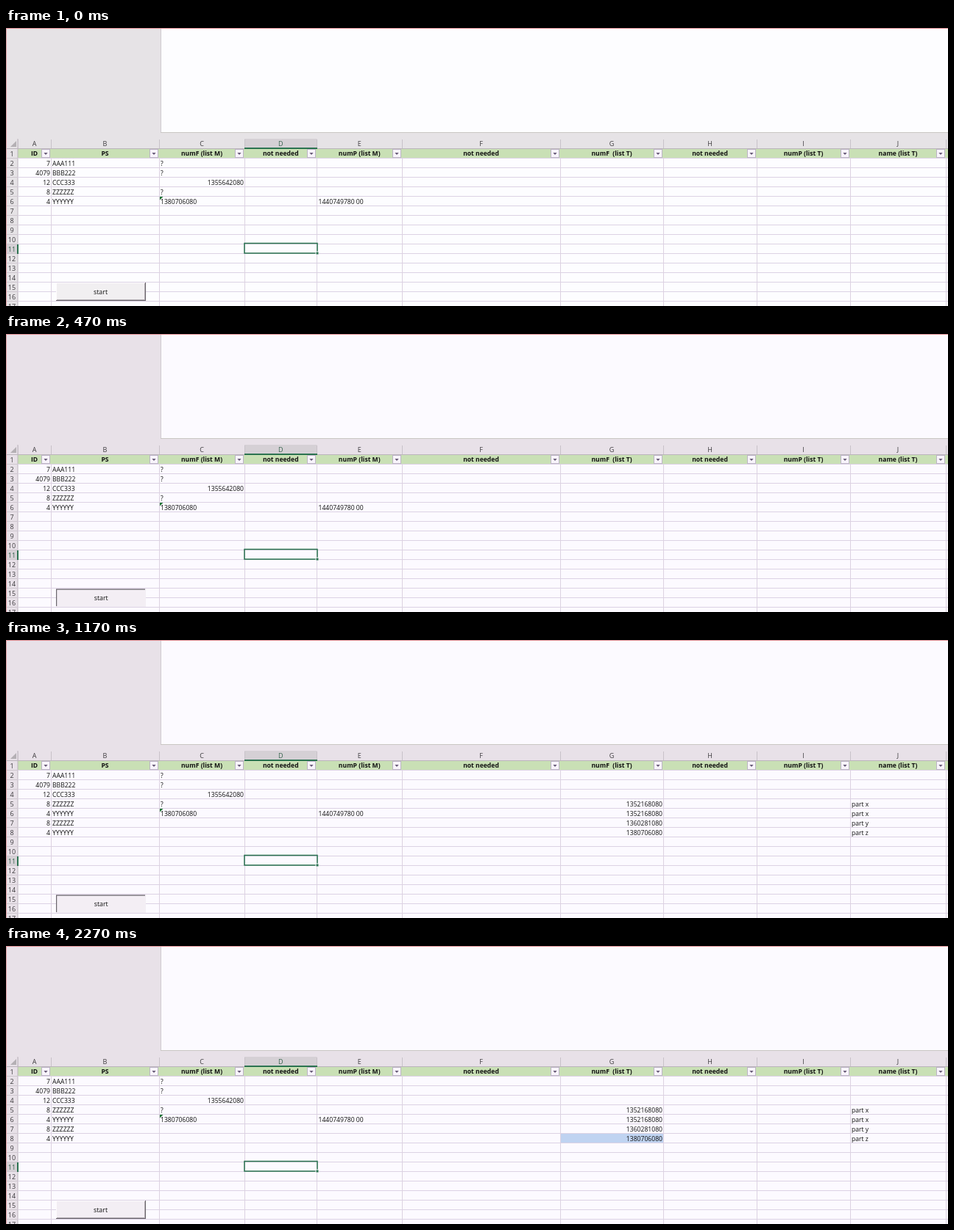
These frames come from a looping animation (1280 by 379 pixels, 2.67 s). An HTML page:

```html
<!DOCTYPE html>
<html lang="en">
<head>
<meta charset="utf-8">
<title>Spreadsheet fill</title>
<style>
  html, body { margin: 0; width: 100%; height: 100%; overflow: hidden; }
  svg { display: block; width: 1280px; height: 379px; }
  text { font: 8.6px "Open Sans", "Noto Sans", sans-serif; fill: #111; white-space: pre; }
  .bold { font-weight: 700; }
  .label { font-size: 9px; fill: #3c3a3d; }
  .active { fill: #35624c; }
  .caption { font-size: 8.9px; }
</style>
</head>
<body>
<svg id="stage" viewBox="0 0 1280 379"></svg>
<script>
const LOOP = 2670, ROW = 13, TOP = 165;
const edges = [16, 61, 208, 324, 422.5, 538, 753, 893, 1020, 1147, 1277];
const titles = ["ID", "PS", "numF (list M)", "not needed", "numP (list M)", "not needed",
  "numF  (list T)", "not needed", "numP (list T)", "name (list T)"];
const stage = document.getElementById("stage");

function add(tag, attrs, content) {
  const node = document.createElementNS("http://www.w3.org/2000/svg", tag);
  for (const key in attrs) node.setAttribute(key, attrs[key]);
  if (content !== undefined) node.textContent = content;
  return stage.appendChild(node);
}
const rect = (x, y, width, height, fill) => add("rect", { x, y, width, height, fill });
const path = (d, fill) => add("path", { d, fill });
const write = (x, y, content, anchor = "start", cls = "") =>
  add("text", { x, y, "text-anchor": anchor, class: cls }, content);
const rowTop = row => TOP + ROW * (row - 1);
const middle = col => (edges[col] + edges[col + 1]) / 2;

// Cells: column, row, text, right aligned, time of appearance
const cells = [];
function cell(col, row, content, right = false, at = 0) {
  const x = right ? edges[col + 1] - 1 : edges[col] + 2;
  const node = write(x, rowTop(row) + 9.6, content, right ? "end" : "start");
  cells.push({ node, at });
}

// Surfaces
const chrome = rect(0, 0, 1280, 379);
const panel = rect(211, 1, 1069, 141);
const sheet = rect(16, TOP, 1264, 214);
rect(210, 0, 1, 143, "#cfcad0");
rect(210, 142, 1070, 1, "#c9c6c3");
rect(0, 0, 1280, 1, "#df8d92");
rect(0, 0, 1, 379, "#dd9fa5");

// Headings
rect(324, 151, 98.5, 13, "#d5d0d5");
rect(1, rowTop(11), 15, ROW, "#d5d0d5");
path("M14 154V162H6Z", "#b4b0b4");
rect(16, TOP, 1264, 12, "#c9e0b5");
rect(0, 164, 1280, 1, "#bbb4bb");
rect(15.5, 151, 1, 228, "#bbb4bb");
for (let row = 1; row <= 17; row++) {
  const y = rowTop(row);
  rect(1, y + 12, 15, 1, "#cec7ce");
  rect(16, y + 12, 1264, 1, "#dcd2e4");
  write(8, y + 9.7, row, "middle", row === 11 ? "label active" : "label");
}
const blue = rect(753, rowTop(8), 140, 12, "#bfd3f1");
edges.forEach((x, col) => {
  rect(Math.floor(x), 152, 1, 12, "#c8c2c9");
  if (col) rect(Math.floor(x), 177, 1, 202, "#dcd2e1");
});
titles.forEach((title, col) => {
  const x = middle(col), end = edges[col + 1];
  write(x, 161.2, String.fromCharCode(65 + col), "middle", col === 3 ? "label active" : "label");
  write(x, 174.4, title, "middle", "bold");
  const box = rect(Math.floor(end) - 12.5, 165.5, 11, 11, "#f8f4fb");
  box.setAttribute("stroke", "#bcb4c5");
  const mid = Math.floor(end) - 7;
  path(`M${mid - 2.6} 170H${mid + 2.6}L${mid} 173Z`, "#685b78");
});
rect(324, 163, 99, 2, "#2b7350");
rect(15, rowTop(11), 2, ROW, "#2b7350");

[["7", "AAA111", "?"], ["4079", "BBB222", "?"], ["12", "CCC333"],
 ["8", "ZZZZZZ", "?"], ["4", "YYYYYY", "1380706080"]].forEach(([id, ps, num], i) => {
  cell(0, i + 2, id, true);
  cell(1, i + 2, ps);
  if (num) cell(2, i + 2, num);
});
cell(2, 4, "1355642080", true);
cell(4, 6, "1440749780 00");
path("M209 230H213.5L209 234.5Z", "#1f7434");

cell(6, 5, "1352168080", true, 630);
cell(9, 5, "part x", false, 700);
cell(6, 6, "1352168080", true, 770);
cell(9, 6, "part x", false, 830);
cell(0, 7, "8", true, 830);
cell(1, 7, "ZZZZZZ", false, 900);
cell(6, 7, "1360281080", true, 900);
cell(9, 7, "part y", false, 970);
cell(0, 8, "4", true, 970);
cell(1, 8, "YYYYYY", false, 1030);
cell(6, 8, "1380706080", true, 1100);
cell(9, 8, "part z", false, 1170);

// Selected cell
add("rect", { x: 324, y: 293.5, width: 99, height: 13.5, fill: "none", stroke: "#27704d", "stroke-width": 1.5 });
rect(420.5, 304.5, 4.5, 4.5, "#fcfaff");
rect(421.5, 305.5, 3, 3, "#27704d");

// Button
const face = rect(68, 347, 122, 25);
const light = path("M68 372V347H190V348H69V372Z", "#fdfbfd");
const shade = path("M188 348H189V371H69V370H188Z", "#b3acb3");
const dark = path("", "#69656c");
const caption = write(128.5, 363.2, "start", "middle", "caption");

function draw(t) {
  const tinted = t >= 30;
  const pressed = t >= 470 && t < 1300;
  chrome.setAttribute("fill", tinted ? "#e8e1e8" : "#e6e3e6");
  panel.setAttribute("fill", tinted ? "#fcfaff" : "#fdfdff");
  sheet.setAttribute("fill", tinted ? "#fcfaff" : "#fdfdff");
  face.setAttribute("fill", tinted ? "#f3eef4" : "#f1eff1");
  for (const { node, at } of cells) node.setAttribute("visibility", t >= at ? "visible" : "hidden");
  blue.setAttribute("visibility", t >= 1230 ? "visible" : "hidden");
  light.setAttribute("visibility", pressed ? "hidden" : "visible");
  shade.setAttribute("visibility", pressed ? "hidden" : "visible");
  dark.setAttribute("d", pressed
    ? "M68 371V347.5H189V348.7H69.2V371Z"
    : "M189 347H190V372H68V371H189Z");
  caption.setAttribute("x", pressed ? 129.2 : 128.5);
}

const start = performance.now();
function tick() {
  draw((performance.now() - start) % LOOP);
  requestAnimationFrame(tick);
}
tick();
</script>
</body>
</html>
```
